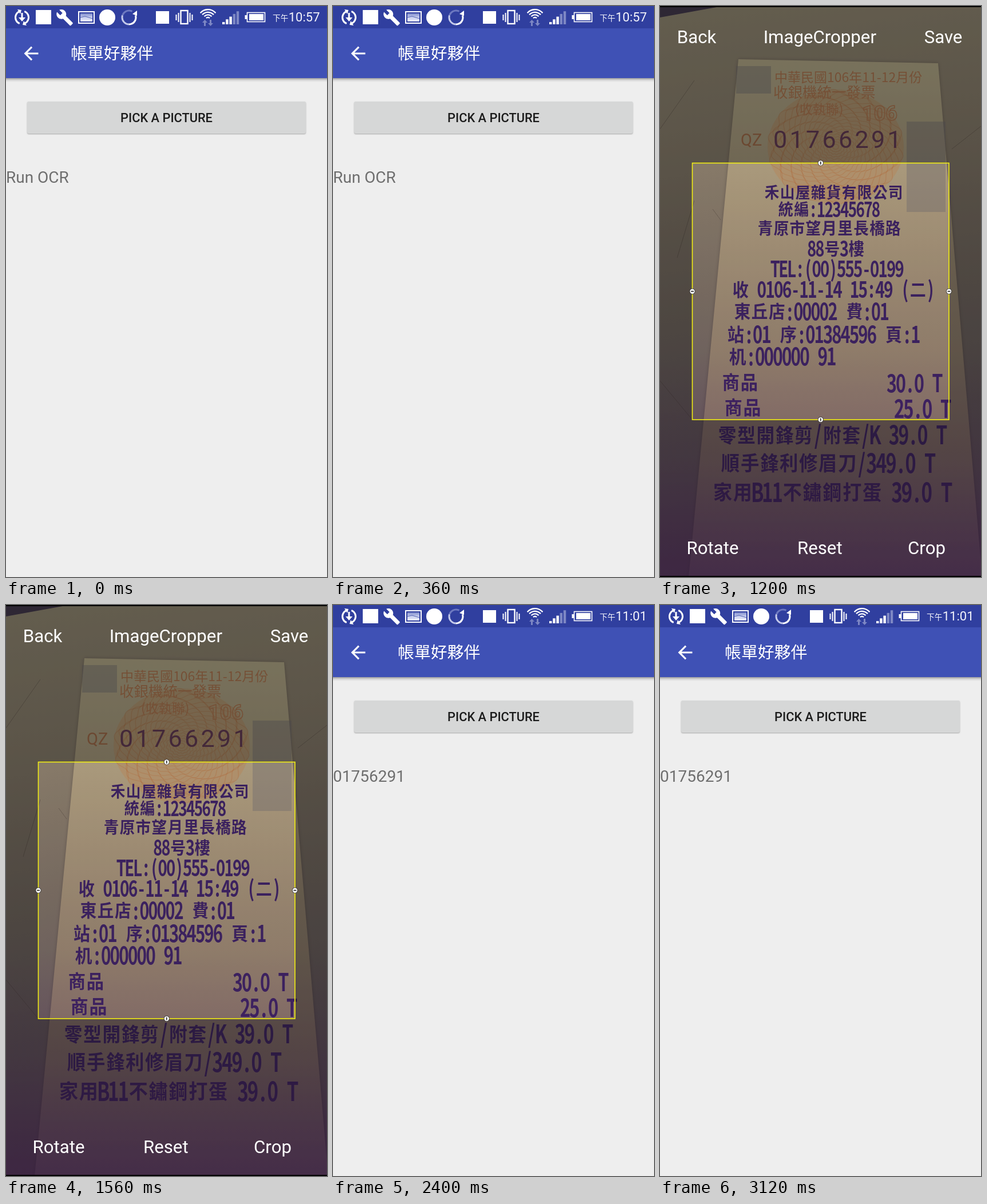
Animation of 561x998 px, one loop 3.6 s. Source, as an HTML page with a canvas:

```html
<!DOCTYPE html>
<html lang="zh-Hant">
<head>
<meta charset="utf-8">
<title>Receipt scanner</title>
<style>
html, body { margin: 0; width: 100%; height: 100%; overflow: hidden; background: #000; }
canvas { display: block; }
</style>
</head>
<body>
<canvas id="stage" width="561" height="998"></canvas>
<script>
const W = 561, H = 998;
const c = document.getElementById('stage').getContext('2d');
const ROBOTO = 'Roboto, sans-serif';
const CJK = '"Noto Sans CJK TC", "Noto Sans CJK JP", "Noto Sans CJK", sans-serif';

function rect(x, y, w, h, fill) {
  c.fillStyle = fill;
  c.fillRect(x, y, w, h);
}
function disc(x, y, r, fill) {
  c.fillStyle = fill;
  c.beginPath();
  c.arc(x, y, r, 0, 7);
  c.fill();
}
function arc(x, y, r, from, to, color, width) {
  c.strokeStyle = color;
  c.lineWidth = width;
  c.beginPath();
  c.arc(x, y, r, from * Math.PI, to * Math.PI);
  c.stroke();
}
function frame(x, y, w, h, color, width) {
  c.strokeStyle = color;
  c.lineWidth = width;
  c.strokeRect(x, y, w, h);
}
function poly(fill, ...p) {
  c.fillStyle = fill;
  c.beginPath();
  for (let i = 0; i < p.length; i += 2) c.lineTo(p[i], p[i + 1]);
  c.fill();
}
function line(color, width, ...p) {
  c.strokeStyle = color;
  c.lineWidth = width;
  c.beginPath();
  for (let i = 0; i < p.length; i += 2) c.lineTo(p[i], p[i + 1]);
  c.stroke();
}
function text(s, x, y, size, fill, align = 'left', weight = 400, font = ROBOTO) {
  c.font = `${weight} ${size}px ${font}`;
  c.textAlign = align;
  c.fillStyle = fill;
  c.fillText(s, x, y);
}
function icon(d, x, y, scale) {
  c.save();
  c.translate(x, y);
  c.scale(scale, scale);
  c.fillStyle = '#fff';
  c.fill(new Path2D(d));
  c.restore();
}
function shade(x0, y0, x1, y1, ...colors) {
  const g = c.createLinearGradient(x0, y0, x1, y1);
  colors.forEach((col, i) => g.addColorStop(i / (colors.length - 1), col));
  return g;
}

// ---- app screen ----
function statusBar(clock) {
  const white = '#fff', faint = '#7d87c4';
  rect(0, 0, W, 39, '#303f9f');
  // sync
  arc(28, 20, 11.5, .62, 1.38, white, 3);
  arc(28, 20, 11.5, -.38, .38, white, 3);
  poly(white, 20, 6, 27, 7, 25, 14);
  poly(white, 36, 34, 29, 33, 31, 26);
  line(white, 3, 28, 12, 28, 22);
  poly(white, 22, 20, 34, 20, 28, 27);
  rect(52, 7, 27, 25, white);
  icon('M22.7 19l-9.1-9.1c.9-2.3.4-5-1.5-6.9-2-2-5-2.4-7.4-1.3L9 6 6 9 1.6 4.7C.4 7.1.9 10.1 2.9 12.1c1.9 1.9 4.6 2.4 6.9 1.5l9.1 9.1c.4.4 1 .4 1.4 0l2.3-2.3c.5-.4.5-1.1.1-1.4z', 87, 4.5, 1.3);
  // picture
  frame(127, 10, 27, 20, white, 2);
  rect(130, 13, 21, 14, shade(0, 13, 0, 27, '#7f8ccc', '#c9cfee', '#eef0fb'));
  line('#5565b5', 1, 130, 20, 138, 18, 151, 22);
  disc(177, 20, 14, white);
  // progress ring
  arc(215, 20, 12, -.1, .5, white, 3);
  arc(215, 20, 12, .5, 1.1, '#c3c9ea', 3);
  arc(215, 20, 12, 1.1, 1.65, '#6d79c0', 3);
  poly(white, 221, 14, 229, 8, 229, 17);
  rect(262, 9, 23, 22, white);
  // vibrate
  frame(305.5, 8, 12, 23, white, 2.4);
  for (const side of [-1, 1]) {
    line(white, 2, 311.5 + side * 10, 12, 311.5 + side * 10, 28);
    line(white, 2, 311.5 + side * 14, 15, 311.5 + side * 14, 25);
  }
  // wifi
  for (let i = 0; i < 4; i++) arc(353, 24, 4 + i * 4.6, 1.23, 1.77, white, 2.3);
  poly(faint, 343, 29, 347.5, 24, 352, 29, 349, 29, 349, 35, 346, 35, 346, 29);
  poly(faint, 353, 30, 357.5, 35, 362, 30, 359, 30, 359, 24, 356, 24, 356, 30);
  for (let i = 0; i < 5; i++) {
    const h = 4 + i * 4.7;
    rect(378 + i * 6.2, 32 - h, 4.4, h, i < 3 ? white : faint);
  }
  // battery
  frame(421.5, 11.5, 31, 16, white, 1.6);
  rect(417.5, 16, 4, 7, white);
  rect(425, 14, 25, 11, white);
  text('下午', 466, 26, 13.7, '#f4f5fc', 'left', 400, CJK);
  text(clock, 548.5, 27, 22, '#f4f5fc', 'right');
}

function appScreen(clock, result) {
  rect(0, 0, W, H, '#eee');
  rect(0, 126, W, 7, shade(0, 126, 0, 133, 'rgba(0,0,0,.34)', 'rgba(0,0,0,.1)', 'rgba(0,0,0,0)'));
  rect(0, 39, W, 87, '#3f51b5');
  statusBar(clock);
  icon('M20 11H7.83l5.59-5.59L12 4l-8 8 8 8 1.41-1.41L7.83 13H20v-2z', 25.3, 64.3, 1.558);
  text('帳單好夥伴', 113, 92.5, 28.9, '#fff', 'left', 400, CJK);
  c.save();
  c.shadowColor = 'rgba(0,0,0,.3)';
  c.shadowBlur = 2;
  c.shadowOffsetY = 1;
  c.fillStyle = '#d6d7d7';
  c.beginPath();
  c.roundRect(37, 167, 487, 56, 3);
  c.fill();
  c.restore();
  text('PICK A PICTURE', 280.5, 203, 21.8, '#1b1b1b', 'center', 500);
  text(result, 0, 309, 28, '#6e6e6e');
}

// ---- receipt photo ----
// text, then x and middle y in the camera view and in the crop view
const ROWS = [
  ['禾山屋雜貨有限公司', 160, 417, 182, 326],
  ['統編:12345678', 186, 455, 206, 356],
  ['青原市望月里長橋路', 151, 492, 170, 388],
  ['88号3樓', 239, 532, 258, 424],
  ['TEL:(00)555-0199', 178, 573, 194, 460],
  ['收 0106-11-14 15:49 (二)', 110, 612, 126, 496],
  ['東丘店:00002 費:01', 117, 655, 129, 534],
  ['站:01 序:01384596 頁:1', 107, 694, 117, 574],
  ['机:000000 91', 111, 735, 120, 613],
  ['商品', 104, 777, 108, 658],
  ['30.0 T', 372, 781, 397, 659],
  ['商品', 109, 821, 112, 702],
  ['25.0 T', 383, 826, 410, 704],
  ['零型開鋒剪/附套/K 39.0 T', 100, 864, 101, 750],
  ['順手鋒利修眉刀/349.0 T', 109, 908, 106, 799],
  ['家用B11不鏽鋼打蛋 39.0 T', 99, 951, 92, 850]
];

const CAMERA = {
  col: 1, cell: y => 28.3 + (y - 417) * .0043,
  paper: [100, 113, 500, 112, 522, H, 75, H],
  boxes: [[100, 136, 65, 68], [428, 257, 75, 203]],
  seal: [291, 313, 128, 127],
  head: [172, 168, 26, 172, 208, 28.3, 215, 246, 26],
  year: [376, 262, 46], prefix: [115, 323, 33],
  serial: [187, 321, 31, 48, -.25],
  scratches: [[20, 290, 95, 175], [0, 622, 76, 692], [22, 600, 72, 690], [495, 8, 561, 72], [228, 0, 250, 32], [508, 395, 561, 330]]
};
const CROP = {
  col: 3, cell: y => 27 + (y - 326) * .0149,
  paper: [137, 93, 486, 100, 563, H, 50, H],
  boxes: [[133, 105, 61, 48], [431, 202, 68, 158]],
  seal: [307, 246, 119, 100],
  head: [200, 133, 23, 198, 160, 25.5, 236, 189, 23],
  year: [384, 200, 36], prefix: [141, 244, 29],
  serial: [210, 248, 28.5, 43, 0],
  scratches: [[0, 215, 60, 130], [92, 355, 106, 374], [30, 440, 60, 340], [0, 655, 58, 725], [510, 250, 561, 210]]
};

// fixed-pitch printing: wide characters fill a cell, others half a cell
function print(s, x, y, cell) {
  c.textAlign = 'center';
  for (const ch of s) {
    const wide = ch > '\u2e80', w = wide ? cell : cell / 2;
    c.save();
    c.translate(x + w / 2, y);
    c.scale(1, wide ? 1.08 : 1.4);
    c.font = `700 ${cell * .95}px ${CJK}`;
    c.fillText(ch, 0, cell * .35);
    c.restore();
    x += w;
  }
}

function serial(x, y, pitch, size, slope, color) {
  [...'01766291'].forEach((d, i) => text(d, x + i * pitch, y + i * slope, size, color, 'center'));
}

function rosette(x, y, rx, ry) {
  c.save();
  c.translate(x, y);
  c.scale(rx, ry);
  disc(0, 0, 1, 'rgba(222,145,85,.3)');
  c.strokeStyle = 'rgba(205,122,66,.32)';
  c.lineWidth = .012;
  for (let ring = 1; ring <= 22; ring++) {
    c.beginPath();
    for (let a = 0; a <= 6.3; a += .03) {
      const r = ring / 23 * (1 + .05 * Math.cos(a * 14 + ring * 1.6));
      c.lineTo(r * Math.cos(a), r * Math.sin(a));
    }
    c.stroke();
  }
  c.restore();
}

function photo(v) {
  const ink = '#d08a5a';
  rect(0, 0, W, H, shade(0, 0, 130, H, '#b0a488', '#a1937c', '#8a7c70', '#77696a', '#6b5867'));
  if (v === CAMERA) {
    rect(0, 0, W, 330, shade(0, 0, 60, 330, 'rgba(135,120,75,.6)', 'rgba(226,215,170,.8)', 'rgba(205,192,155,.4)', 'rgba(190,175,140,0)'));
    rect(300, 0, 261, 500, shade(300, 0, W, 0, 'rgba(110,95,75,0)', 'rgba(110,95,75,.4)'));
  } else {
    poly('#4a3d56', 0, 0, 110, 0, 0, 20);
  }
  for (const s of v.scratches) line('rgba(70,55,50,.35)', 1, ...s);
  c.save();
  c.shadowColor = 'rgba(60,45,45,.35)';
  c.shadowBlur = 6;
  poly(shade(0, 100, 0, H, '#d6c9a0', '#c3b08e', '#ac977f', '#9b8575', '#88717b'), ...v.paper);
  c.restore();
  for (const b of v.boxes) rect(...b, 'rgba(130,124,128,.42)');
  rosette(...v.seal);
  const [x1, y1, s1, x2, y2, s2, x3, y3, s3] = v.head;
  text('中華民國106年11-12月份', x1, y1, s1, ink, 'left', 500, CJK);
  text('收銀機統一發票', x2, y2, s2, ink, 'left', 500, CJK);
  text('(收執聯)', x3, y3, s3, ink, 'left', 400, CJK);
  c.font = `700 ${v.year[2]}px ${ROBOTO}`;
  c.textAlign = 'center';
  c.strokeStyle = ink;
  c.lineWidth = 1.6;
  c.strokeText('106', v.year[0], v.year[1]);
  text('QZ', ...v.prefix, '#bd7a50');
  serial(...v.serial, '#73405f');
  c.fillStyle = '#43256f';
  for (const r of ROWS) {
    const y = r[v.col + 1];
    print(r[0], r[v.col], y, v.cell(y));
  }
  rect(0, 600, W, 398, shade(0, 600, 0, H, 'rgba(100,32,122,0)', 'rgba(100,32,122,.17)', 'rgba(100,32,122,.5)'));
}

function cameraScreen() {
  photo(CAMERA);
  disc(291, 98, 3.5, '#80704f');
  for (let i = 0; i < 3; i++) {
    rect(46 + i * 12, 46, 8.5, 8.5, '#8f8a75');
    rect(47 + i * 12, 47, 6.5, 6.5, '#fff');
  }
  // automatic flash
  line('#fff', 2, 482, 48, 493, 39, 492, 51);
  line('#fff', 2, 486, 45, 492, 46);
  poly('#fff', 486, 52, 491, 51, 493, 58, 498, 47, 508, 52, 508, 46, 517, 54, 508, 61, 508, 56, 500, 53, 496, 63, 488, 62);
  // gallery
  rect(25, 885, 74, 74, '#171219');
  frame(25.5, 885.5, 73, 73, '#b3a4b0', 2);
  for (const x of [53, 70.5]) for (const y of [913, 930.5]) arc(x, y, 7.3, 0, 2, '#fff', 2);
  // shutter
  disc(282, 922, 56, 'rgba(12,7,14,.9)');
  arc(282, 922, 56.5, 0, 2, '#b9abb4', 2);
  rect(266, 897, 31, 48, '#fff');
  rect(269, 900, 3, 9, '#111');
  disc(283, 921, 15, '#111');
  arc(283, 921, 11, 0, 2, '#fff', 3.5);
}

// ---- cropper ----
function cropFrame(x, y, w, h, top, bottom, dim) {
  c.fillStyle = `rgba(12,14,14,${dim})`;
  c.beginPath();
  c.rect(0, top, W, bottom - top);
  c.rect(x, y, w, h);
  c.fill('evenodd');
  frame(x, y, w, h, '#f2ee12', 1.6);
  [[x + w / 2, y], [x + w / 2, y + h], [x, y + h / 2], [x + w, y + h / 2]].forEach(([hx, hy], i) => {
    disc(hx, hy, 5, '#333');
    disc(hx, hy, 4.2, '#fff');
    if (i < 2) rect(hx - 1, hy - 2.5, 2, 5, '#444');
    else rect(hx - 2.5, hy - 1, 5, 2, '#444');
  });
}

function labels() {
  const put = (s, x, y) => text(s, x, y, 31.2, '#fff', 'center');
  put('Back', 64, 65);
  put('ImageCropper', 279.3, 65);
  put('Save', 495, 65);
  put('Rotate', 92, 958);
  put('Reset', 279.3, 958);
  put('Crop', 466, 958);
}

function cropScreen() {
  photo(CROP);
  rect(0, 0, W, H, 'rgba(20,14,16,.17)');
  cropFrame(56.5, 274.5, 448.5, 448.5, 0, H, .36);
  rect(0, 0, W, 2, '#000');
  rect(0, 996, W, 2, '#000');
  labels();
}

function zoomScreen() {
  const top = 402, bottom = 596;
  rect(0, 0, W, H, '#000');
  c.save();
  c.beginPath();
  c.rect(0, top, W, bottom - top);
  c.clip();
  rect(0, top, W, 194, shade(0, top, W, bottom, '#b5a083', '#c09f7d', '#bf9a77', '#ba9778', '#b0a086'));
  rect(533, top, 28, 130, 'rgba(190,182,160,.5)');
  // embossed pattern
  for (let i = 0; i < 70; i++) {
    const x = i * 97 % 561, y = 410 + i * 61 % 180;
    arc(x, y, 18 + i * 13 % 30, i * .37, i * .37 + .3, 'rgba(222,188,150,.2)', 2.5);
  }
  c.shadowColor = '#8f6c62';
  c.shadowBlur = 4;
  serial(49, 528, 66.5, 90, .7, '#704c4e');
  c.restore();
  cropFrame(11.5, 426.5, 534.5, 154.5, top, bottom, .48);
  labels();
}

const scenes = [
  () => appScreen('10:57', 'Run OCR'),
  cameraScreen,
  cropScreen,
  zoomScreen,
  () => appScreen('11:01', '01756291')
];
const start = performance.now();
let shown = -1;
function tick() {
  const t = (performance.now() - start) % 3600;
  const i = Math.min(4, Math.floor(t / 600));
  if (i !== shown) scenes[shown = i]();
  requestAnimationFrame(tick);
}
tick();
</script>
</body>
</html>
```
